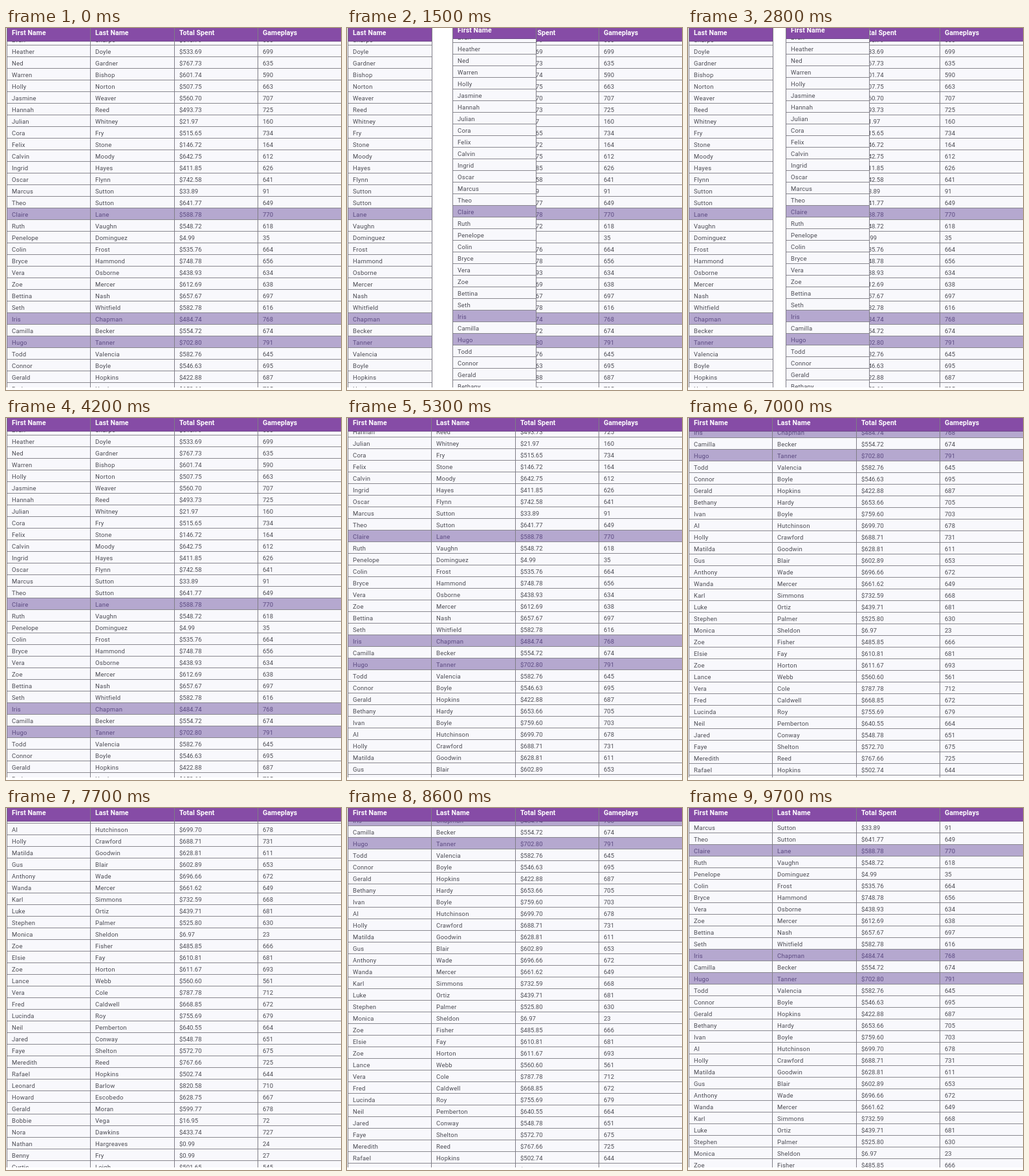
An HTML page for the animation above (9.8 s loop, 518 by 560 pixels).

```html
<!DOCTYPE html>
<html lang="en">
<head>
<meta charset="utf-8">
<title>Player table</title>
<style>
  html, body { margin: 0; width: 100%; height: 100%; overflow: hidden; background: #fff; }
  svg { display: block; }
  text { font-family: Roboto, "Open Sans", sans-serif; font-size: 9.5px; fill: #4b4b52; }
  .name { letter-spacing: .22px; }
  .marked { fill: #5b4a80; }
  .head { font-size: 10.5px; font-weight: 700; letter-spacing: .1px; fill: #fff; }
</style>
</head>
<body>
<svg id="stage" width="518" height="560" viewBox="0 0 518 560"></svg>
<script>
const LOOP = 9800, STEP = 100;
const COL_W = 129.4, ROW_H = 18, FIRST_ROW_Y = 8, HEAD_H = 21, TABLE_BOTTOM = 556;
const HEADS = ["First Name", "Last Name", "Total Spent", "Gameplays"];

// A trailing * marks a highlighted row.
const ROWS = `Evan Sharpe 618.79 660
Heather Doyle 533.69 699
Ned Gardner 767.73 635
Warren Bishop 601.74 590
Holly Norton 507.75 663
Jasmine Weaver 560.70 707
Hannah Reed 493.73 725
Julian Whitney 21.97 160
Cora Fry 515.65 734
Felix Stone 146.72 164
Calvin Moody 642.75 612
Ingrid Hayes 411.85 626
Oscar Flynn 742.58 641
Marcus Sutton 33.89 91
Theo Sutton 641.77 649
Claire Lane 588.78 770 *
Ruth Vaughn 548.72 618
Penelope Dominguez 4.99 35
Colin Frost 535.76 664
Bryce Hammond 748.78 656
Vera Osborne 438.93 634
Zoe Mercer 612.69 638
Bettina Nash 657.67 697
Seth Whitfield 582.78 616
Iris Chapman 484.74 768 *
Camilla Becker 554.72 674
Hugo Tanner 702.80 791 *
Todd Valencia 582.76 645
Connor Boyle 546.63 695
Gerald Hopkins 422.88 687
Bethany Hardy 653.66 705
Ivan Boyle 759.60 703
Al Hutchinson 699.70 678
Holly Crawford 688.71 731
Matilda Goodwin 628.81 611
Gus Blair 602.89 653
Anthony Wade 696.66 672
Wanda Mercer 661.62 649
Karl Simmons 732.59 668
Luke Ortiz 439.71 681
Stephen Palmer 525.80 630
Monica Sheldon 6.97 23
Zoe Fisher 485.85 666
Elsie Fay 610.81 681
Zoe Horton 611.67 693
Lance Webb 560.60 561
Vera Cole 787.78 712
Fred Caldwell 668.85 672
Lucinda Roy 755.69 679
Neil Pemberton 640.55 664
Jared Conway 548.78 651
Faye Shelton 572.70 675
Meredith Reed 767.66 725
Rafael Hopkins 502.74 644
Leonard Barlow 820.58 710
Howard Escobedo 628.75 667
Gerald Moran 599.77 678
Bobbie Vega 16.95 72
Nora Dawkins 433.74 727
Nathan Hargreaves 0.99 24
Benny Fry 0.99 27
Curtis Leigh 501.65 545
Megan Stark 574.60 652`.split("\n").map(line => line.split(" "));

const stage = document.getElementById("stage");

function add(parent, tag, attrs = {}, content = "") {
  const node = document.createElementNS("http://www.w3.org/2000/svg", tag);
  for (const key in attrs) node.setAttribute(key, attrs[key]);
  node.textContent = content;
  parent.appendChild(node);
  return node;
}

function rect(parent, x, y, width, height, fill) {
  return add(parent, "rect", { x, y, width, height, fill });
}

const slotX = i => Math.round(1 + COL_W * i);
const move = (node, x, y) => node.setAttribute("transform", `translate(${x} ${y})`);

function buildColumn(index) {
  const group = add(stage, "g");
  const width = slotX(index + 1) - slotX(index);
  rect(group, 0, 0, width, 570, "#f8f8fc");
  const body = add(group, "g");
  ROWS.forEach((row, i) => {
    const y = FIRST_ROW_Y + ROW_H * i;
    const marked = row[4] === "*";
    if (marked) rect(body, 0, y, width, ROW_H, "#b5a8cf");
    rect(body, 0, y, width, 1, "#88878e");
    add(body, "text", {
      x: 8, y: y + 14,
      class: (index < 2 ? "name" : "") + (marked ? " marked" : "")
    }, (index === 2 ? "$" : "") + row[index]);
  });
  rect(group, 0, 0, width, HEAD_H, "#864ca6");
  rect(group, 0, HEAD_H - 1, width, 1, "#6f4a88");
  add(group, "text", { x: 8, y: 11, class: "head" }, HEADS[index]);
  rect(group, 0, 0, 1, 570, "#7f7d86");
  rect(group, width, 0, 1, 570, "#7f7d86");
  return { group, body };
}

// The dragged first column is built last so that it lies on top.
const columns = [];
for (const i of [3, 2, 1, 0]) columns[i] = buildColumn(i);
rect(stage, 0, TABLE_BOTTOM, 518, 4, "#fff");

const clamp = v => Math.max(0, Math.min(1, v));
const smooth = v => { v = clamp(v); return v * v * (3 - 2 * v); };

// Column drag: out to the right and back again.
const DRAG_END = 4200, DRAG_REACH = 200;
const dragX = t => t >= DRAG_END ? 0 : DRAG_REACH * (1 - Math.cos(2 * Math.PI * t / DRAG_END)) / 2;
const swap = t => smooth((t - 800) / 350) - smooth((t - 3350) / 350);

// Scroll: soft start, steady speed, then straight back up.
const SCROLL_START = 4300, SOFT = 900, TURN = 7810, SPEED = 0.19;
function scrollY(t) {
  const full = SPEED * (TURN - SCROLL_START - SOFT / 2);
  if (t > TURN) return full - SPEED * (t - TURN);
  const u = Math.max(0, t - SCROLL_START);
  return u < SOFT ? SPEED * u * u / (2 * SOFT) : SPEED * (u - SOFT / 2);
}

function render(time) {
  const t = Math.floor((time % LOOP) / STEP) * STEP;
  const dx = dragX(t);
  move(columns[0].group, slotX(0) + Math.round(dx), -Math.round(4 * smooth(dx / 60)));
  move(columns[1].group, Math.round(slotX(1) - (slotX(1) - slotX(0)) * swap(t)), 0);
  move(columns[2].group, slotX(2), 0);
  move(columns[3].group, slotX(3), 0);
  const y = -Math.round(scrollY(t));
  columns.forEach(column => move(column.body, 0, y));
}

const start = performance.now();
function tick() {
  render(performance.now() - start);
  requestAnimationFrame(tick);
}
tick();
</script>
</body>
</html>
```
